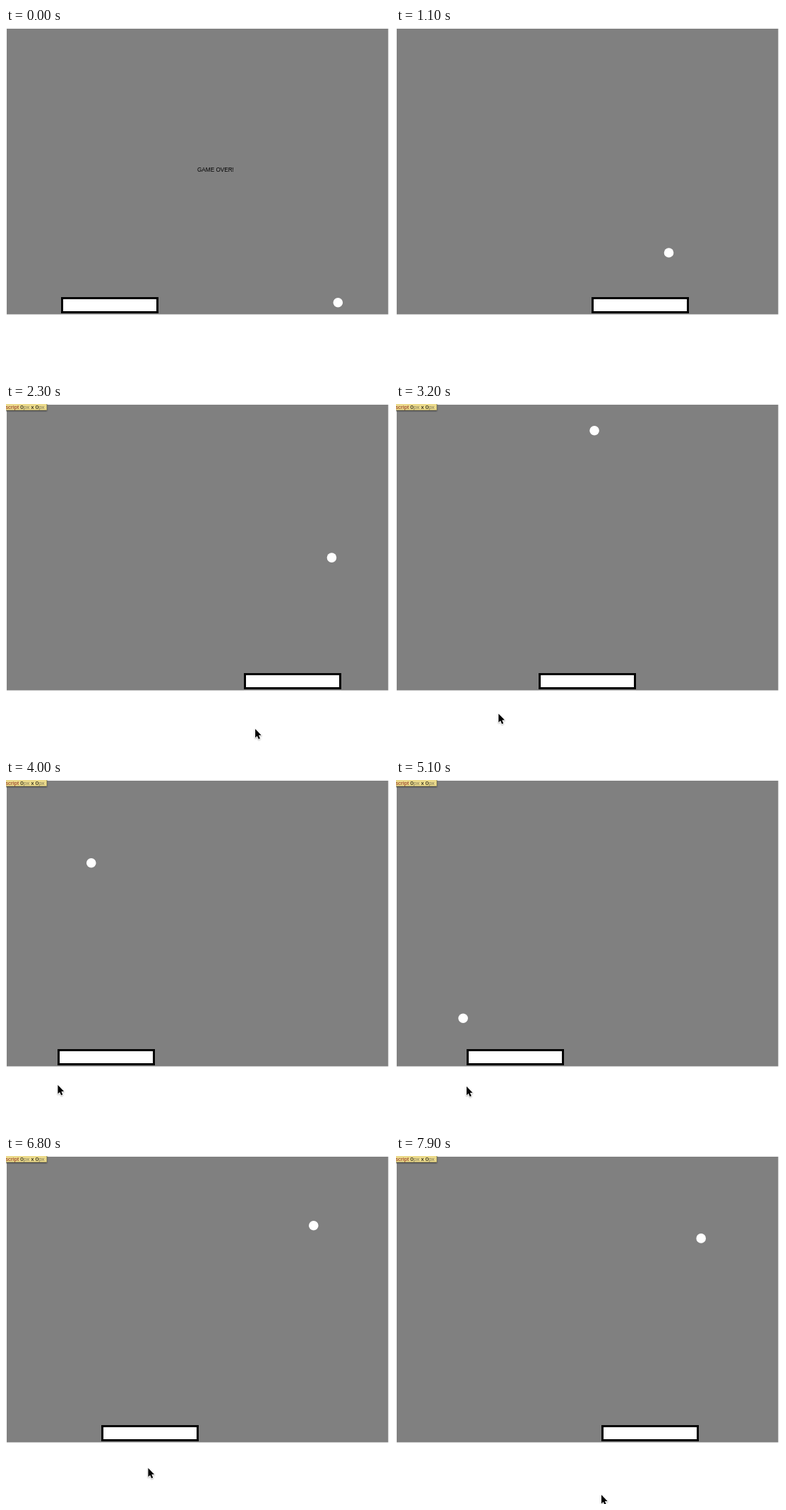
An HTML page with a canvas that plays this animation: 544 by 494 pixels, repeating every 8 s.

```html
<!DOCTYPE html>
<html lang="en">
<head>
<meta charset="utf-8">
<title>Paddle game</title>
<style>
  html, body { margin: 0; width: 100%; height: 100%; overflow: hidden; background: #fff; }
  canvas { display: block; }
</style>
</head>
<body>
<canvas id="stage" width="544" height="494"></canvas>
<script>
const ctx = document.getElementById('stage').getContext('2d');
const LOOP = 8000, STEP = 100;
const RESTART = 600, INSPECT = 1800;
const FONT = '"Liberation Sans", Arial, sans-serif';
const FIELD = [1, 1, 540.5, 405.5];

const BALL = { x: 286.3, y: 218.8, speed: 0.2004, radius: 6.8 };
const WALLS = { left: -2.3, right: 544.2, top: -2.4, bottom: 388.8 };

// Turning points of the hand: time, x, y. The paddle trails the cursor by LAG.
const LAG = 100;
const HAND = [
  [700, 78, 475], [1400, 403, 475], [2000, 310, 475], [2710, 382, 452],
  [3700, 17, 433], [4000, 73, 433], [5200, 100, 435], [6050, 326, 450],
  [6500, 18, 448], [7190, 312, 440], [7650, 305, 445], [7900, 291, 481]
];

const ease = p => (1 - Math.cos(Math.PI * p)) / 2;

function hand(t) {
  const next = HAND.findIndex(point => point[0] > t);
  if (next === 0) return HAND[0].slice(1);
  if (next < 0) return HAND[HAND.length - 1].slice(1);
  const [t0, x0, y0] = HAND[next - 1], [t1, x1, y1] = HAND[next];
  const k = ease((t - t0) / (t1 - t0));
  return [x0 + (x1 - x0) * k, y0 + (y1 - y0) * k];
}

// Folds a straight run into a path that bounces between two walls.
function bounce(pos, low, high) {
  const span = high - low;
  const run = (pos - low) % (2 * span);
  return low + span - Math.abs(span - run);
}

function rect(color, x, y, w, h) {
  ctx.fillStyle = color;
  ctx.fillRect(x, y, w, h);
}

function text(str, x, y, size, color) {
  ctx.font = size + 'px ' + FONT;
  ctx.fillStyle = color;
  ctx.fillText(str, x, y);
  return x + ctx.measureText(str).width;
}

function drawBall(x, y) {
  ctx.fillStyle = '#fff';
  ctx.beginPath();
  ctx.arc(x, y, BALL.radius, 0, Math.PI * 2);
  ctx.fill();
}

function drawPaddle(x) {
  rect('#000', x, 382, 138, 23);
  rect('#fff', x + 3, 385, 132, 17);
}

function drawTooltip() {
  ctx.save();
  ctx.shadowColor = 'rgba(0,0,0,.55)';
  ctx.shadowBlur = 2;
  ctx.shadowOffsetY = 1;
  rect('#9c8f58', -4, -4, 62, 13);
  ctx.restore();
  rect('#ecdb8c', -4, -4, 61.4, 12.4);
  let x = text('script ', -1, 6.5, 8, '#8c2d1c');
  for (const lead of ['0', ' x 0']) {
    x = text(lead, x, 6.5, 8, '#000');
    x = text('px', x, 6.5, 8, '#7d7658');
  }
}

function drawCursor(x, y) {
  const arrow = new Path2D('M0 0V12.4L2.7 9.9L4.7 14.5L6.8 13.5L4.9 9.1L8.6 8.9Z');
  ctx.save();
  ctx.translate(x, y);
  ctx.shadowColor = 'rgba(0,0,0,.3)';
  ctx.shadowBlur = 2;
  ctx.shadowOffsetY = 1;
  ctx.lineJoin = 'round';
  ctx.lineWidth = 1.6;
  ctx.strokeStyle = '#fff';
  ctx.stroke(arrow);
  ctx.shadowColor = 'transparent';
  ctx.fillStyle = '#000';
  ctx.fill(arrow);
  ctx.restore();
}

function draw(t) {
  rect('#fff', 0, 0, 544, 494);
  rect('#808080', ...FIELD);
  ctx.save();
  ctx.beginPath();
  ctx.rect(...FIELD);
  ctx.clip();
  drawPaddle(Math.round(hand(t)[0]));
  if (t < RESTART) {
    drawBall(470.3, 389.7);
    text('GAME OVER!', 271, 204, 8.2, '#000');
  } else {
    const run = BALL.speed * (t - RESTART);
    drawBall(bounce(BALL.x + run, WALLS.left, WALLS.right),
             bounce(BALL.y + run, WALLS.top, WALLS.bottom));
  }
  ctx.restore();
  if (t >= INSPECT) {
    drawTooltip();
    drawCursor(...hand(t + LAG));
  }
}

function tick() {
  draw(Math.floor(performance.now() % LOOP / STEP) * STEP);
  requestAnimationFrame(tick);
}
tick();
</script>
</body>
</html>
```
